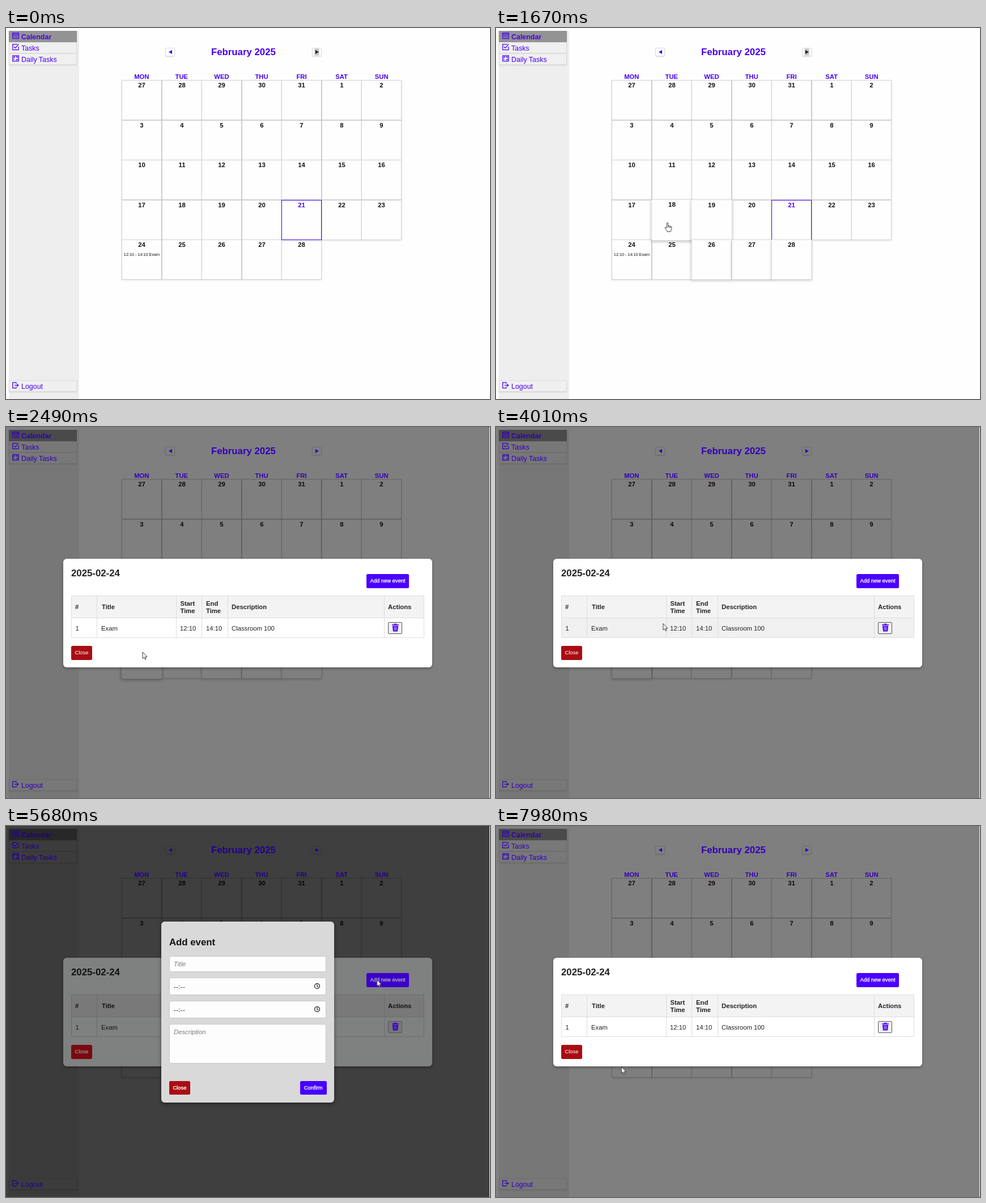
An HTML page for the animation above (8 s loop, 854 px wide and 656 px high).

```html
<!DOCTYPE html>
<html lang="en">
<head>
<meta charset="utf-8">
<title>Calendar</title>
<style>
html, body { margin: 0; width: 100%; height: 100%; overflow: hidden; background: #f6f6f6; }
#page, #page div, #page svg { position: absolute; box-sizing: border-box; }
#page {
  --bg: #fefefe; --bar: #eee; --item: #f0f0f0; --on: #939393; --line: #d3d3d3; --edge: #ddd;
  --ink: #111; --hue: #4700f0; --next: #222; --sel: #c4c4c4;
  --card: #fff; --rule: #ddd; --head: #f3f3f3; --text: #222; --add: #4b00ff; --red: #a90d13; --label: #fff; --bin: #efefef;
  left: 0; top: 0; width: 853px; height: 656px; overflow: hidden; background: var(--bg); color: var(--ink);
  font: 11.29px "Liberation Sans", Arial, sans-serif;
  animation: dim 8s step-end infinite;
}
/* a paragraph's top is the middle of its capitals */
p { position: absolute; margin: 0; line-height: 0; white-space: nowrap; }
svg { overflow: visible; }
.b { font-weight: bold; }
.hue { color: var(--hue); }
.big { font-size: 16.8px; font-weight: bold; }

#bar { left: 5px; top: 5px; width: 124px; height: 651px; background: var(--bar); }
.item { left: 0; width: 120px; height: 20px; background: var(--item); border: 1px solid var(--edge); box-shadow: 0 1px 2px #0002; color: var(--hue); font-size: 12.45px; }
.item p { left: 21px; top: 10px; }
.item svg { left: 5px; top: 2px; fill: none; stroke: var(--hue); stroke-width: 1.3; }
.item.on { background: var(--on); border-color: var(--on); font-weight: bold; }

.nav { top: 35px; width: 17px; height: 15px; border: 1px solid var(--edge); border-radius: 2px; box-shadow: 0 1px 2px #0002; }
.name, .cell p { width: 100%; text-align: center; }
.name { width: 70.6px; top: 85.5px; }
.cell { width: 71px; height: 71px; background: var(--bg); border: 1px solid var(--line); box-shadow: 0 1px 3px #0002; }
.cell .b { top: 8px; }
.cell .note { top: 25.5px; font-size: 7.25px; }
.cell.today { border-color: var(--hue); color: var(--hue); z-index: 1; }
.pop { animation: pop 8s var(--d) infinite; }
.stay { animation: stay 8s var(--d) infinite; }

#day { left: 101px; top: 233px; width: 651px; height: 192px; border-radius: 6px; background: var(--card); color: var(--text); box-shadow: 0 2px 5px #0005; animation: day 8s step-end infinite; z-index: 3; visibility: hidden; }
#form { left: 274px; top: 169px; width: 304.5px; height: 319.5px; border-radius: 6px; background: #d9d9d9; color: #111; box-shadow: 0 2px 6px #0007; animation: form 8s step-end infinite; z-index: 4; visibility: hidden; }
.btn { height: 24.5px; border-radius: 2.5px; color: #fff; font-size: 9.4px; }
.btn p { top: 12.2px; width: 100%; text-align: center; }
.bold p { -webkit-text-stroke: .3px; }
.field { left: 14px; width: 277px; background: #fdfdfd; border: 1px solid #c8c8c8; border-radius: 3px; }
.field p { left: 7px; }
.field i { color: #777; }
.field svg { left: 260px; top: 14px; fill: none; stroke: #111; stroke-width: 1.2; }
.row { left: 14px; top: 105px; width: 623px; height: 35px; animation: row 8s step-end infinite; }
#add { background: var(--add); color: var(--label); animation: add 8s step-end infinite; }
#shut { background: #a90d13; animation: shut 8s step-end infinite; }

#mouse { left: 0; top: 0; z-index: 5; fill: #fff; stroke: #222; stroke-width: .9; animation: move 8s linear infinite; }
#mouse * { visibility: hidden; }
#mouse .dot { fill: #e3b800c0; stroke: none; animation: dot 8s step-end infinite; }
#mouse .arrow { animation: arrow 8s step-end infinite; }
#mouse .hand { animation: hand 8s step-end infinite; }
#mouse .beam { fill: none; stroke: #111; animation: beam 8s step-end infinite; }

@keyframes dim {
  30.4%, 97.1% {
    --bg: #7f7f7f; --bar: #777; --item: #787878; --on: #4a4a4a; --line: #666; --edge: #6e6e6e;
    --ink: #100608; --hue: #3200b8; --next: #3200b8; --sel: transparent;
    --card: #fff; --rule: #ddd; --head: #f3f3f3; --text: #222; --add: #4b00ff; --red: #a90d13; --label: #fff; --bin: #efefef;
  }
  69.4% {
    --bg: #3f3f3f; --bar: #3b3b3b; --item: #3c3c3c; --on: #282828; --line: #313131; --edge: #363636;
    --ink: #080406; --hue: #23008c; --next: #23008c; --sel: transparent;
    --card: #7f8080; --rule: #6b6b6b; --head: #797979; --text: #111; --add: #3a00cc; --red: #780a10; --label: #b0acb8; --bin: #777;
  }
}
@keyframes pop {
  1.5%, 3% { transform: scale(1.03); box-shadow: 0 2px 5px #0004; border-color: var(--edge); z-index: 2; }
  6%, 100% { transform: none; }
}
@keyframes stay {
  1.5%, 7% { transform: scale(1.03); box-shadow: 0 2px 5px #0004; z-index: 2; }
  10%, 100% { transform: none; }
}
@keyframes day { 30.4% { visibility: visible; } }
@keyframes form { 69.4% { visibility: visible; } 97.1% { visibility: hidden; } }
@keyframes row { 37% { background: #f0f0f0; } 59% { background: none; } }
@keyframes add { 66.6% { background: #3c00d4; } 69.4% { background: var(--add); } }
@keyframes shut { 95% { background: #6b0d14; } 97.1% { background: #a90d13; } }
@keyframes dot {
  29.5%, 68.5%, 96.2% { visibility: visible; }
  30.4%, 69.4%, 97.1% { visibility: hidden; }
}
@keyframes arrow {
  .875%, 12.4%, 30.4%, 69.4%, 86.6%, 93.5%, 97.1% { visibility: visible; }
  5.7%, 14%, 66.6%, 77.3%, 90.5%, 95% { visibility: hidden; }
}
@keyframes hand {
  5.7%, 14%, 66.6%, 95% { visibility: visible; }
  12.4%, 30.4%, 69.4%, 97.1% { visibility: hidden; }
}
@keyframes beam {
  77.3%, 90.5% { visibility: visible; }
  86.6%, 93.5% { visibility: hidden; }
}
@keyframes move {
  0%, .875% { transform: translate(795px, 648px); }
  5.625% { transform: translate(545px, 446px); }
  8.125% { transform: translate(455px, 415px); }
  10.375% { transform: translate(475px, 435px); }
  13% { transform: translate(488px, 465px); }
  15.625% { transform: translate(425px, 405px); }
  17.5% { transform: translate(395px, 364px); }
  19.375% { transform: translate(338px, 350px); }
  20.875%, 21.375% { transform: translate(302.5px, 344px); }
  27%, 31.2% { transform: translate(241px, 398px); }
  39% { transform: translate(230px, 364px); }
  43.375%, 46.5% { transform: translate(190px, 350px); }
  50.125% { transform: translate(294.5px, 347.5px); }
  54.375% { transform: translate(420px, 351px); }
  57.125%, 58% { transform: translate(450px, 351px); }
  67.25%, 71.25% { transform: translate(654.5px, 272px); }
  78% { transform: translate(424px, 233px); }
  82.375%, 85.75% { transform: translate(356px, 240px); }
  95.375%, 97.125% { transform: translate(316px, 461px); }
  99.7%, 100% { transform: translate(221.5px, 426px); }
}
</style>
</head>
<body>
<div id="page">
  <div id="bar">
    <div class="item on" style="top:0"><p>Calendar</p>
      <svg width="12" height="12"><path d="M.7 1H11.3V10.6H.7ZM.7 3.6H11.3"/><path d="M2.5 6H10M2.5 8.2H10" stroke-dasharray="1.4 1"/></svg></div>
    <div class="item" style="top:20px"><p>Tasks</p>
      <svg width="12" height="12"><path d="M11 5V10.6H.8V.8H9M3 4.8L5.4 7.6L11.4.6"/></svg></div>
    <div class="item" style="top:40px"><p>Daily Tasks</p>
      <svg width="12" height="12"><path d="M.8 .8H11.2V10.6H.8ZM3 5V3H5M6.5 3H9V5M3 6.5V8.4M6.5 8.4H9V6.6"/></svg></div>
    <div class="item" style="top:618px"><p>Logout</p>
      <svg width="12" height="12"><path d="M7 3V.8H.8V10.6H7V8.4M4 5.7H10.6M8.4 3.4L10.8 5.7L8.4 8"/></svg></div>
  </div>

  <p class="big hue" style="left:362px;top:42.5px">February 2025</p>
  <div class="nav" style="left:280.5px"><svg width="15" height="13"><path d="M11 3V10L5 6.5Z" fill="var(--hue)"/></svg></div>
  <div class="nav" style="left:539.5px"><svg width="15" height="13"><path d="M3.5 .5H11.5V12.5H3.5Z" fill="var(--sel)"/><path d="M4.8 3V10L11 6.5Z" fill="var(--next)"/></svg></div>
  <div id="grid"></div>

  <div id="day">
    <p class="big" style="left:14px;top:26px">2025-02-24</p>
    <div class="btn bold" id="add" style="left:535px;top:27px;width:75px"><p>Add new event</p></div>
    <div style="left:14px;top:65px;width:623px;height:40px;background:var(--head)"></div>
    <div class="row"></div>
    <svg width="651" height="192" style="left:0;top:0" fill="none" stroke="var(--rule)"><path d="M14.5 65.5H636.5V139.5H14.5ZM14.5 104.5H636.5M59.5 65.5V139.5M199.5 65.5V139.5M244.5 65.5V139.5M290.5 65.5V139.5M566.5 65.5V139.5"/></svg>
    <div class="b" id="heads"></div>
    <div id="vals"></div>
    <div style="left:573px;top:112px;width:25px;height:20.5px;background:var(--bin);border:1px solid #555;border-radius:2px"></div>
    <svg width="14" height="16" style="left:579px;top:114px" fill="var(--add)"><path d="M1 2H4.5L5 .8H9L9.5 2H13V3.6H1ZM1.8 4.4H12.2L11 14.4H3Z"/><path d="M5 6L5.4 12.6M9 6L8.6 12.6M7 6V12.6" stroke="var(--bin)" stroke-width=".7"/></svg>
    <div class="btn" style="left:14px;top:154px;width:37px;background:var(--red);color:var(--label)"><p>Close</p></div>
  </div>

  <div id="form">
    <p class="big" style="left:14px;top:37px">Add event</p>
    <div class="field" style="top:61px;height:28px"><p style="top:12.5px"><i>Title</i></p></div>
    <div class="field time" style="top:99px;height:30.5px"></div>
    <div class="field time" style="top:140px;height:30.5px"></div>
    <div class="field" style="top:181px;height:69.5px"><p style="top:13px"><i>Description</i></p></div>
    <div class="btn bold" id="shut" style="left:14px;top:281.5px;width:37px"><p>Close</p></div>
    <div class="btn bold" style="left:245px;top:281.5px;width:46.5px;background:#4500ff"><p>Confirm</p></div>
  </div>

  <svg id="mouse" width="1" height="1">
    <circle class="dot" cx="0" cy="1" r="9"/>
    <path class="arrow" d="M0 0V11.3L2.6 9L4.4 13L6.2 12.2L4.5 8.3H8Z"/>
    <path class="hand" d="M-1.2 1Q0-.8 1.2 1V6Q2.4 4.8 3.4 6.2Q4.6 5.4 5.4 6.8Q7.2 6.4 7.2 8.4V11Q7 13.4 5.8 14.6V16H-.6V14.8Q-3 12-4.4 9Q-3.6 7.2-1.2 9.4ZM1.2 6V9M3.4 6.4V9M5.4 7V9.2"/>
    <path class="beam" d="M-2.5-6Q0-6 0-5Q0-6 2.5-6M0-5V5M-2.5 6Q0 6 0 5Q0 6 2.5 6"/>
  </svg>
</div>
<script>
const PITCH = 70.57, LEFT = 204, TOP = 92;
const $ = q => document.querySelector(q);
const put = (x, y, s) => `<p style="left:${x}px;top:${y}px">${s}</p>`;

// hover start in ms for each day the pointer crosses
const hover = { 28: 470, 27: 640, 26: 1290, 19: 1380, 18: 1540, 17: 1810, 24: 1940 };

let html = ['MON', 'TUE', 'WED', 'THU', 'FRI', 'SAT', 'SUN']
  .map((d, i) => `<p class="name b hue" style="left:${LEFT + i * PITCH}px">${d}</p>`).join('');
for (let i = 0; i < 33; i++) {
  const day = i < 5 ? 27 + i : i - 4;
  const start = i > 4 && hover[day];
  const kind = start ? (day === 24 ? 'stay' : 'pop') : '';
  const x = Math.round(LEFT + i % 7 * PITCH), y = Math.round(TOP + Math.floor(i / 7) * PITCH);
  html += `<div class="cell ${kind} ${i === 25 ? 'today' : ''}" style="left:${x}px;top:${y}px;--d:${start || 0}ms">
    <p class="b">${day}</p>${i === 28 ? '<p class="note">12:10 - 14:10 Exam</p>' : ''}</div>`;
}
$('#grid').innerHTML = html;

$('#heads').innerHTML = put(21, 85, '#') + put(68, 85, 'Title') + put(206.5, 79, 'Start') + put(206.5, 91.5, 'Time')
  + put(252, 79, 'End') + put(252, 91.5, 'Time') + put(297, 85, 'Description') + put(573, 85, 'Actions');
$('#vals').innerHTML = put(21.5, 122.5, '1') + put(67, 122.5, 'Exam') + put(206, 122.5, '12:10')
  + put(252, 122.5, '14:10') + put(297, 122.5, 'Classroom 100');

document.querySelectorAll('.time').forEach(f => {
  f.innerHTML = '<p style="top:14.5px;letter-spacing:.4px">--:--</p>'
    + '<svg width="1" height="1"><circle r="4.4"/><path d="M0-2.8V0L2 1.4"/></svg>';
});
</script>
</body>
</html>
```
